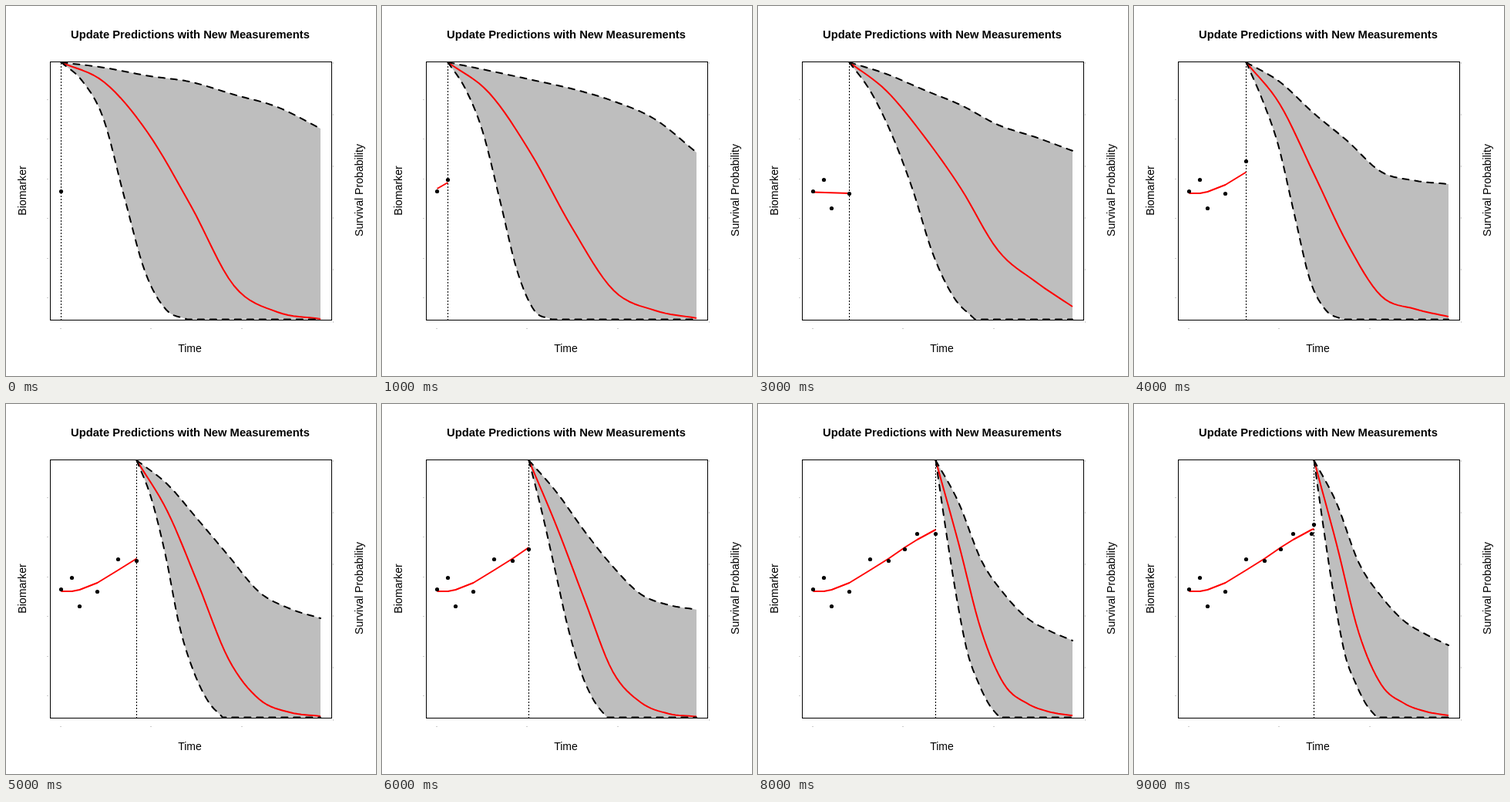
Recreate the animation shown at these times as an HTML page with a canvas. Size 480 by 480 pixels, loop 10000 ms.

```html
<!DOCTYPE html>
<html lang="en">
<head>
<meta charset="utf-8">
<title>Update Predictions</title>
<style>
html, body { margin: 0; width: 100%; height: 100%; overflow: hidden; background: #fff; }
canvas { display: block; width: 100vw; height: 100vh; }
</style>
</head>
<body>
<canvas id="stage" width="480" height="480"></canvas>
<script>
const ctx = document.getElementById('stage').getContext('2d');
const STEP = 1000, LEFT = 57, TOP = 72, RIGHT = 422, BOTTOM = 407;
const START_Y = 73, FLOOR_Y = 406.5, END = 408;
const FONT = '"Liberation Sans", Arial, sans-serif';

const visits = [
  [71, 240], [85, 225], [95, 262], [118, 243], [145, 201],
  [169, 203], [190, 188], [206, 168], [230, 168], [233, 156]
];
const startX = step => visits[step][0] + 0.5;

// Heights at six even steps; the lower bound takes its steps up to floorX.
const forecasts = [];
function forecast(step, upper, middle, lower, floorX) {
  forecasts[step] = { upper, middle, lower: [...lower, FLOOR_Y], floorX };
}
forecast(0, [80, 90.5, 98.5, 115, 131, 159], [99, 164, 259, 363, 397, 406], [97, 145, 247, 345, 394], 235);
forecast(1, [84, 95.5, 107.5, 123.5, 147, 190], [113, 191, 288, 369, 395, 405], [107, 162, 251, 343, 395], 220);
forecast(2, [79.5, 83, 89, 102.5, 122, 151], [95.5, 127, 176, 267, 327, 379], [101, 152, 208, 293, 364], 291);
forecast(4, [98.5, 139, 175, 215, 226.5, 231], [127.5, 217, 308, 376, 393, 403], [121, 180, 269, 356, 395], 270);
forecast(5, [104, 150, 197, 244, 265.5, 278], [139, 233, 331, 383, 400, 405], [121, 195, 289, 348, 386], 281);
forecast(7, [123, 177, 221, 248.5, 257, 258], [175, 271, 359, 390, 403, 406], [154, 229, 290, 347, 384], 300);
forecast(9, [128, 206, 249.5, 281, 299, 313], [181, 297, 364, 388, 399, 404], [169, 257, 327, 363, 390], 315);

// The remaining visits blend their neighbours by where they start.
for (const step of [3, 6, 8]) {
  const a = forecasts[step - 1], b = forecasts[step + 1];
  const mix = (startX(step) - startX(step - 1)) / (startX(step + 1) - startX(step - 1));
  const blend = (p, q) => p + (q - p) * mix;
  const blendAll = name => a[name].map((y, i) => blend(y, b[name][i]));
  forecasts[step] = {
    upper: blendAll('upper'), middle: blendAll('middle'), lower: blendAll('lower'),
    floorX: blend(a.floorX, b.floorX)
  };
}

// Smooth curve through evenly spaced heights, starting at full survival.
function curve(x0, x1, heights) {
  const ys = [START_Y, ...heights], last = ys.length - 1;
  const tangent = k => {
    const a = Math.max(k - 1, 0), b = Math.min(k + 1, last);
    return (ys[b] - ys[a]) / (b - a);
  };
  const points = [];
  for (let u = 0; u <= last; u += 0.125) {
    const k = Math.min(Math.floor(u), last - 1), t = u - k, s = 1 - t;
    const y = ys[k] * (1 + 2 * t) * s * s + ys[k + 1] * t * t * (3 - 2 * t) +
      t * s * (tangent(k) * s - tangent(k + 1) * t);
    points.push([x0 + (x1 - x0) * u / last, Math.min(y, FLOOR_Y)]);
  }
  return points;
}

// Straight fits at first, then one settled trend that grows.
const early = { 1: [237, 229], 2: [241.5, 244], 3: [241.5, 243] };
const trend = [243, 243, 241, 232, 215.5, 200.5, 186, 176, 163, 162];
function fitLine(step) {
  if (step === 0) return [];
  if (step in early) return [[startX(0), early[step][0]], [startX(step), early[step][1]]];
  return trend.slice(0, step + 1).map((y, i) => [startX(i), y]);
}

function trace(points) {
  points.forEach(([x, y], i) => i ? ctx.lineTo(x, y) : ctx.moveTo(x, y));
}

function stroke(points, color, width, dash = [], cap = 'butt') {
  ctx.beginPath();
  trace(points);
  ctx.strokeStyle = color;
  ctx.lineWidth = width;
  ctx.lineCap = cap;
  ctx.setLineDash(dash);
  ctx.stroke();
}

function label(text, x, y, size, turned) {
  ctx.save();
  ctx.translate(x, y);
  if (turned) ctx.rotate(-Math.PI / 2);
  ctx.font = size + ' ' + FONT;
  ctx.textAlign = 'center';
  ctx.fillStyle = '#000';
  ctx.fillText(text, 0, 0);
  ctx.restore();
}

function drawAxes() {
  ctx.setLineDash([]);
  ctx.strokeStyle = '#000';
  ctx.lineWidth = 1;
  ctx.strokeRect(LEFT + 0.5, TOP + 0.5, RIGHT - LEFT, BOTTOM - TOP);
  ctx.fillStyle = '#ccc';
  for (let i = 0; i < 6; i++) ctx.fillRect(53, Math.round(121 + i * 51.4), 2, 1);
  for (let i = 0; i < 6; i++) ctx.fillRect(424, Math.round(72.5 + i * 67.2), 1, 2);
  for (let i = 0; i < 3; i++) ctx.fillRect(Math.round(70 + i * 117.3), 418, 2, 1);
  label('Update Predictions with New Measurements', 239, 42, 'bold 14.75px');
  label('Time', 238.5, 449, '14px');
  label('Biomarker', 26, 239.5, '14.2px', true);
  label('Survival Probability', 463, 239, '14.1px', true);
}

function draw(step) {
  ctx.fillStyle = '#fff';
  ctx.fillRect(0, 0, 480, 480);
  const f = forecasts[step], now = startX(step);
  const upper = curve(now, END, f.upper);
  const middle = curve(now, END, f.middle);
  const lower = [...curve(now, f.floorX, f.lower), [END, FLOOR_Y]];

  ctx.save();
  ctx.beginPath();
  ctx.rect(LEFT, TOP, RIGHT - LEFT + 1, BOTTOM - TOP + 1);
  ctx.clip();
  ctx.lineJoin = 'round';
  ctx.beginPath();
  trace([...upper, ...lower.slice().reverse()]);
  ctx.fillStyle = '#bebebe';
  ctx.fill();
  stroke(middle, '#f00', 2);
  stroke(upper, '#000', 2, [8, 8], 'round');
  stroke(lower, '#000', 2, [8, 8], 'round');

  stroke([[now, BOTTOM + 1], [now, TOP]], '#000', 1, [2, 2]);
  stroke(fitLine(step), '#f00', 2);
  ctx.fillStyle = '#000';
  for (const [x, y] of visits.slice(0, step + 1)) {
    ctx.beginPath();
    ctx.arc(x + 0.5, y + 0.5, 2.6, 0, 2 * Math.PI);
    ctx.fill();
  }
  ctx.restore();
  drawAxes();
}

const start = performance.now();
function tick() {
  draw(Math.floor((performance.now() - start) / STEP) % visits.length);
  requestAnimationFrame(tick);
}
tick();
</script>
</body>
</html>
```
